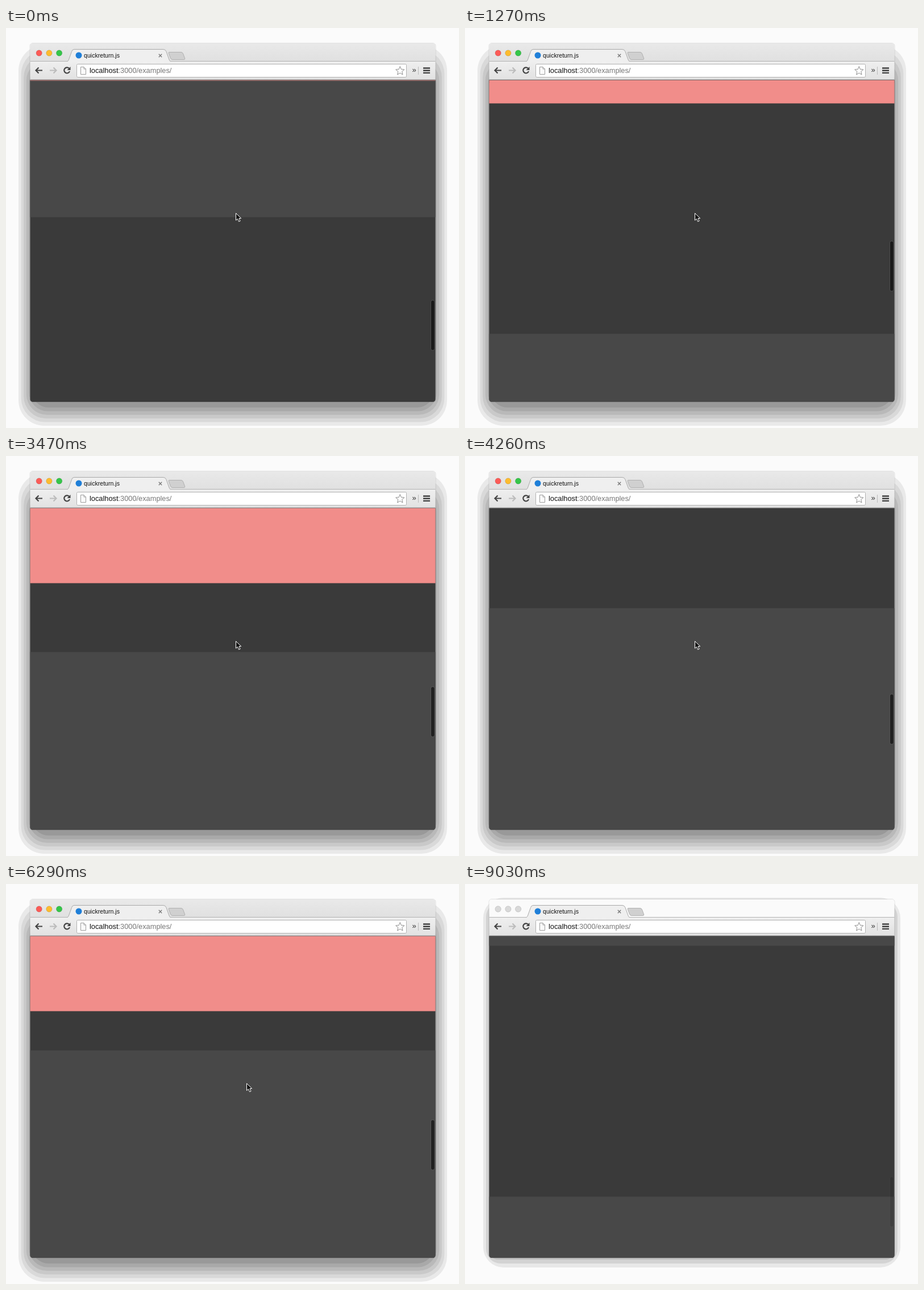
Animation, 797 px wide and 703 px high, one loop 9070 ms. Source, as an HTML page:

```html
<!DOCTYPE html>
<html lang="en">
<head>
<meta charset="utf-8">
<title>quickreturn.js</title>
<style>
  html, body { margin: 0; width: 100%; height: 100%; overflow: hidden; background: #fbfbfb; }
  svg { display: block; }
  text { font-family: "Liberation Sans", Arial, sans-serif; white-space: pre; }
</style>
</head>
<body>
<svg width="797" height="703" viewBox="0 0 797 703">
  <defs>
    <linearGradient id="titleShade" x2="0" y2="1">
      <stop stop-color="#e9e9e9"/><stop offset="1" stop-color="#e0e0e0"/>
    </linearGradient>
    <linearGradient id="toolShade" x2="0" y2="1">
      <stop stop-color="#efefef"/><stop offset="1" stop-color="#e1e1e1"/>
    </linearGradient>
    <clipPath id="windowClip"><rect x="42.5" y="27" width="713" height="630" rx="4.5"/></clipPath>
    <clipPath id="pageClip"><rect x="42" y="91.5" width="714" height="566"/></clipPath>
  </defs>

  <rect width="797" height="703" fill="#fbfbfb"/>
  <g id="activeShadow"></g>
  <g id="idleShadow"></g>
  <rect x="42" y="26.5" width="714" height="631" rx="5" fill="none" stroke="#000" stroke-opacity=".1"/>

  <g clip-path="url(#windowClip)">
    <rect id="titleBar" x="42" y="27" width="714" height="32"/>
    <g id="lights"></g>

    <path d="M287 42.5Q285.5 42.5 286.5 45L289.5 53Q290.5 55.5 293 55.5H313Q315.5 55.5 314.5 53L311.5 45Q310.5 42.5 308 42.5Z" fill="#d0d0d0" stroke="#b0b0b0"/>
    <path d="M42 58.5H756" stroke="#b3b3b3"/>
    <path d="M106 59.5C109.5 58.5 110 57 111 54L115.5 41.5Q116.5 37.5 120 37.5H277Q280.5 37.5 282 41.5L286.5 54C287.5 57 288 58.5 291 59.5Z" fill="#efefef" stroke="#a9a9a9"/>
    <rect x="42" y="59" width="714" height="33" fill="url(#toolShade)"/>
    <path d="M42 91H756" stroke="#989898"/>
    <circle cx="128" cy="48" r="5.5" fill="#1f7fd8"/>
    <text x="137" y="52" font-size="10.6" fill="#111">quickreturn.js</text>
    <path d="M268.8 45.8l5.4 5.4m0-5.4l-5.4 5.4" stroke="#777" stroke-width="1.3"/>

    <g fill="none" stroke-width="2.2">
      <path d="M64 74.5H52.5M57.5 69.5L52.5 74.5L57.5 79.5" stroke="#444"/>
      <path d="M77 74.5H88.5M83.5 69.5L88.5 74.5L83.5 79.5" stroke="#bcbcbc"/>
      <path d="M111 71A5 5 0 1 0 112 76" stroke="#444"/>
    </g>
    <path d="M113.5 68V74H107.5Z" fill="#444"/>

    <rect x="124.5" y="63.5" width="580" height="23" rx="2" fill="#fff" stroke="#b1b1b1"/>
    <path d="M131.5 68.5H137L140.5 72V81.5H131.5ZM137 68.5V72H140.5" fill="#fafafa" stroke="#9b9b9b"/>
    <text x="147" y="79.3" font-size="12.8" fill="#111">localhost<tspan fill="#777">:3000/examples/</tspan></text>
    <path id="star" fill="#fff" stroke="#8b8b8b"/>
    <text x="714.5" y="78" font-size="13" fill="#333">»</text>
    <path d="M725.5 68V82" stroke="#bbb"/>
    <path d="M734 70.5h12m-12 4.2h12m-12 4.2h12" stroke="#404040" stroke-width="2.4"/>

    <g clip-path="url(#pageClip)">
      <rect x="42" y="91" width="714" height="566" fill="#3a3a3a"/>
      <g id="bands" fill="#484848"></g>
      <rect id="header" x="42" y="91.5" width="714" fill="#f18d8a"/>
      <rect id="thumb" x="747.5" width="6.5" height="88" rx="3.2" fill="#000" fill-opacity=".55" stroke="#fff" stroke-opacity=".16"/>
    </g>
  </g>
  <path id="cursor" d="M.5 .5V13L3.5 10.3L5.6 15.2L8 14.2L6 9.5H9.8Z" fill="#111" stroke="#fff"/>
</svg>

<script>
const LOOP = 9070, IDLE = 9030, IDLE_SCROLL = 223;
const PAGE_TOP = 91.5, BAND = 441, HEADER = 132, PX_PER_THUMB = 6.25;
const FADE_DELAY = 360, FADE_TIME = 180, FADED = 0.2;

const $ = id => document.getElementById(id);
const clamp = (v, lo, hi) => Math.max(lo, Math.min(hi, v));
const mix = (a, b, p) => a + (b - a) * p;

const swing = p => (1 - Math.cos(Math.PI * p)) / 2;
const glide = p => 1 - (1 - p) ** 1.4;
const launch = p => p * p;

// Scroll gestures alternate up and down; each continues from the last offset.
const gestures = [
  { start: 0, end: 920, to: -739, ease: glide },
  { start: 950, end: 2700, to: 391, ease: swing },
  { start: 2745, end: 3640, to: -534, ease: swing },
  { start: 4122, end: 5320, to: 450, ease: glide },
  { start: 5320, end: 5940, to: -402, ease: swing },
  { start: 6950, end: 7795, to: -69, ease: glide }
];
gestures.forEach((g, i) => { g.from = i ? gestures[i - 1].to : 0; });

const moves = [
  { start: 6030, end: 6730, from: [404, 325], to: [542, 442], sway: 20 },
  { start: 7930, end: 8360, from: [542, 442], to: [743, 599], sway: 0 }
];

const current = (list, t) => list.filter(item => item.start <= t).pop() || list[0];
const progress = (item, t) => clamp((t - item.start) / (item.end - item.start), 0, 1);

function add(parent, tag, attrs) {
  const el = document.createElementNS("http://www.w3.org/2000/svg", tag);
  for (const key in attrs) el.setAttribute(key, attrs[key]);
  return parent.appendChild(el);
}

function buildShadow(parent, count, outer, inner) {
  for (let i = 0; i < count; i++) {
    const at = key => mix(outer[key], inner[key], i / (count - 1));
    const x = at("x"), y = at("y"), gray = at("gray");
    add(parent, "rect", {
      x, y, width: 798 - 2 * x, height: at("bottom") - y, rx: at("rx"),
      fill: `rgb(${gray},${gray},${gray})`
    });
  }
}

buildShadow($("activeShadow"), 6,
  { x: 22, y: 30, bottom: 699, rx: 45, gray: 233 },
  { x: 45, y: 74, bottom: 667, rx: 30, gray: 153 });
buildShadow($("idleShadow"), 3,
  { x: 32, y: 24, bottom: 674, rx: 36, gray: 232 },
  { x: 42, y: 40, bottom: 660, rx: 16, gray: 190 });

const lightColors = ["#fc5b57", "#fdbc2f", "#35c649"];
const lights = lightColors.map((_, i) =>
  add($("lights"), "circle", { cx: 58.2 + i * 17.7, cy: 44, r: 5.2, stroke: "#000", "stroke-opacity": 0.12 }));
const bands = [0, 1].map(() => add($("bands"), "rect", { x: 42, width: 714, height: BAND }));

const starPoints = Array.from({ length: 10 }, (_, i) => {
  const r = i % 2 ? 3.6 : 8, angle = i * Math.PI / 5;
  return [693.3 + r * Math.sin(angle), 75.5 - r * Math.cos(angle)];
});
$("star").setAttribute("d", "M" + starPoints.join("L") + "Z");

function renderPage(t, idle) {
  const g = current(gestures, t);
  const scroll = idle ? IDLE_SCROLL : mix(g.from, g.to, g.ease(progress(g, t)));

  const period = 2 * BAND, bandTop = PAGE_TOP - 2 - scroll - 200.5 + 0.5;
  const firstTop = ((bandTop % period) + period) % period - period;
  bands.forEach((band, i) => band.setAttribute("y", Math.round(firstTop + i * period) + 0.5));

  // Scrolling up pulls the header in, scrolling down pushes it out.
  const hidden = g.to < g.from ? 0 : HEADER;
  $("header").setAttribute("height", Math.round(clamp(hidden + g.from - scroll, 0, HEADER)));

  const fade = clamp((t - g.end - FADE_DELAY) / FADE_TIME, 0, 1);
  $("thumb").setAttribute("y", Math.round(479 + scroll / PX_PER_THUMB) - 0.5);
  $("thumb").setAttribute("opacity", mix(1, FADED, fade));
}

function renderCursor(t) {
  const m = current(moves, t), p = launch(progress(m, t));
  const x = mix(m.from[0], m.to[0], p);
  const y = mix(m.from[1], m.to[1], p) + m.sway * Math.sin(Math.PI * p);
  $("cursor").setAttribute("transform", `translate(${Math.round(x)} ${Math.round(y)})`);
  $("cursor").style.display = t < moves[1].end ? "" : "none";
}

function render(t) {
  const idle = t >= IDLE;
  renderPage(t, idle);
  renderCursor(t);
  $("activeShadow").style.display = idle ? "none" : "";
  $("idleShadow").style.display = idle ? "" : "none";
  $("titleBar").setAttribute("fill", idle ? "#fafafa" : "url(#titleShade)");
  lights.forEach((light, i) => light.setAttribute("fill", idle ? "#d9d9d9" : lightColors[i]));
}

const start = performance.now();
function tick() {
  render((performance.now() - start) % LOOP);
  requestAnimationFrame(tick);
}
tick();
</script>
</body>
</html>
```
